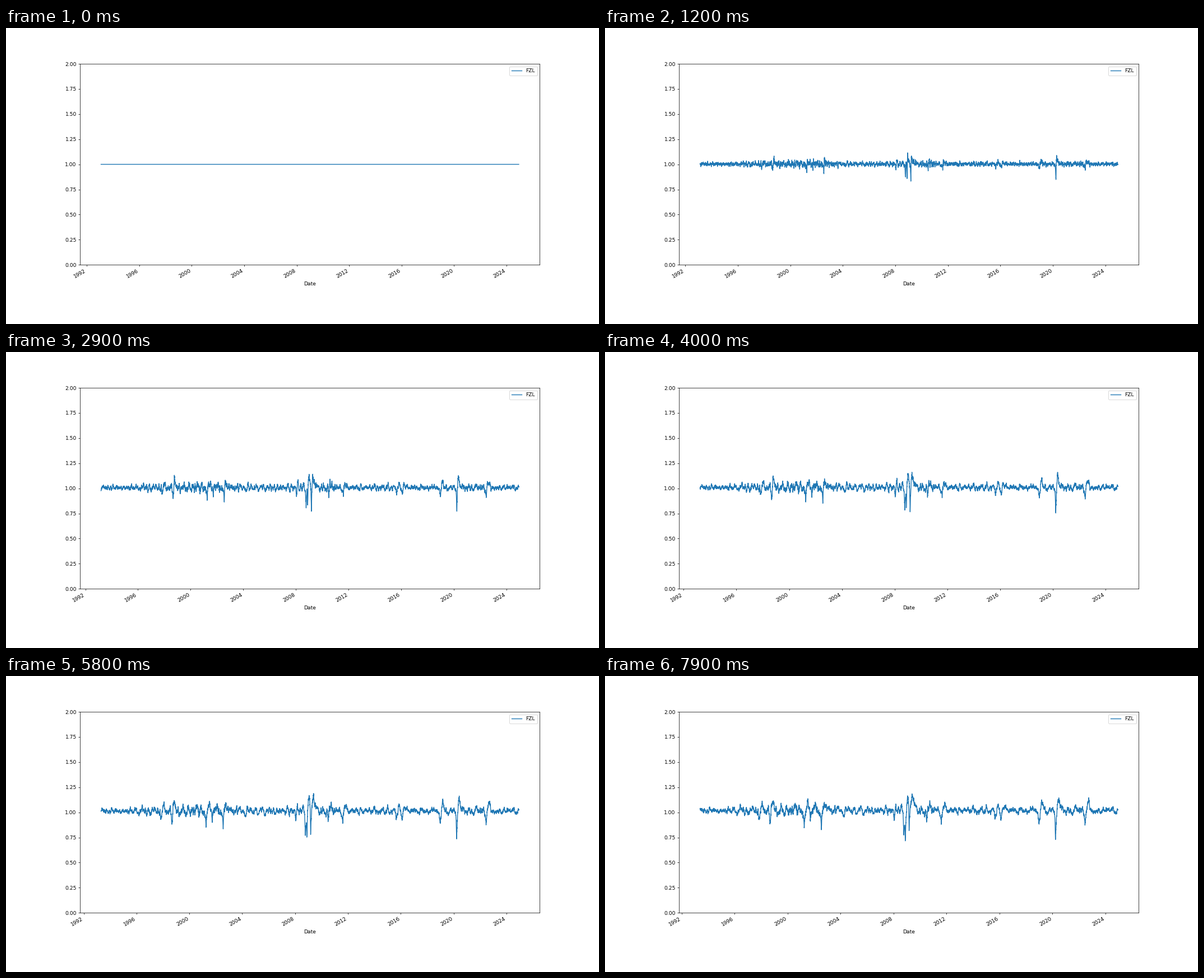
Write a matplotlib script that moves like this. It is 1058 px wide and 529 px high and loops after 8 s.

```python
import numpy as np
import matplotlib.pyplot as plt
from matplotlib.animation import FuncAnimation
from matplotlib.ticker import FormatStrFormatter, MultipleLocator

FRAMES = 80
DAYS = 8025
START, END = 1993.078, 2024.94

GROWTH = 0.11            # log growth per year
FALL, RISE = 0.04, 0.10  # years to fall into a crash and to recover

# Year of each market low and its depth in log price
CRASHES = [
    (1997.82, 0.08), (1998.67, 0.17), (2001.26, 0.16), (2001.72, 0.18),
    (2002.56, 0.26), (2008.05, 0.11), (2008.78, 0.27), (2008.89, 0.36),
    (2009.18, 0.34), (2010.50, 0.11), (2011.61, 0.16), (2015.65, 0.12),
    (2016.12, 0.11), (2018.98, 0.17), (2020.23, 0.37), (2022.46, 0.15),
]


def bump(t, center, width):
    return np.exp(-((t - center) / width) ** 2)


def crash(t, low, depth):
    return depth * np.exp(-np.where(t < low, (low - t) / FALL, (t - low) / RISE))


def make_prices(t):
    """Steady growth with crashes and noise that grows in rough times."""
    rng = np.random.default_rng(11)
    slump = sum(crash(t, low, depth) for low, depth in CRASHES)
    sigma = (0.0055 + 0.0045 * bump(t, 2000.3, 2.8)
             + 0.002 * bump(t, 2009.5, 2.5) + 0.002 * bump(t, 2021.5, 1.5)
             + 0.025 * slump)
    noise = sigma * rng.standard_normal(len(t))
    for i in range(1, len(t)):
        noise[i] += 0.95 * noise[i - 1]
    return np.exp(GROWTH * (t - START) - slump + noise)


def ratio_to_mean(window):
    means = (sums[window:] - sums[:-window]) / window
    return prices[window - 1:] / means


days = np.linspace(START, END, DAYS)
prices = make_prices(days)
sums = np.concatenate(([0], np.cumsum(prices)))

plt.rcParams["font.family"] = "DejaVu Sans"
fig, ax = plt.subplots(figsize=(16, 8), dpi=66.125)
fig.subplots_adjust(left=0.125, right=0.9, bottom=0.2, top=0.879)
line, = ax.plot([], [], color="#1f77b4", lw=1.5, label="FZL")
ax.set_ylim(0, 2)
ax.yaxis.set_major_locator(MultipleLocator(0.25))
ax.yaxis.set_major_formatter(FormatStrFormatter("%.2f"))
ax.xaxis.set_major_locator(MultipleLocator(4))
ax.xaxis.set_major_formatter(FormatStrFormatter("%d"))
ax.set_xlabel("Date")
ax.legend(loc="upper right")


def draw(frame):
    shown = days[frame:]
    line.set_data(shown, ratio_to_mean(frame + 1))
    margin = 0.05 * (shown[-1] - shown[0])
    ax.set_xlim(shown[0] - margin, shown[-1] + margin)
    plt.setp(ax.get_xticklabels(), rotation=30, ha="right")
    return line,


anim = FuncAnimation(fig, draw, frames=FRAMES, init_func=lambda: draw(0),
                     interval=100, repeat=True, repeat_delay=0)
plt.show()
```
